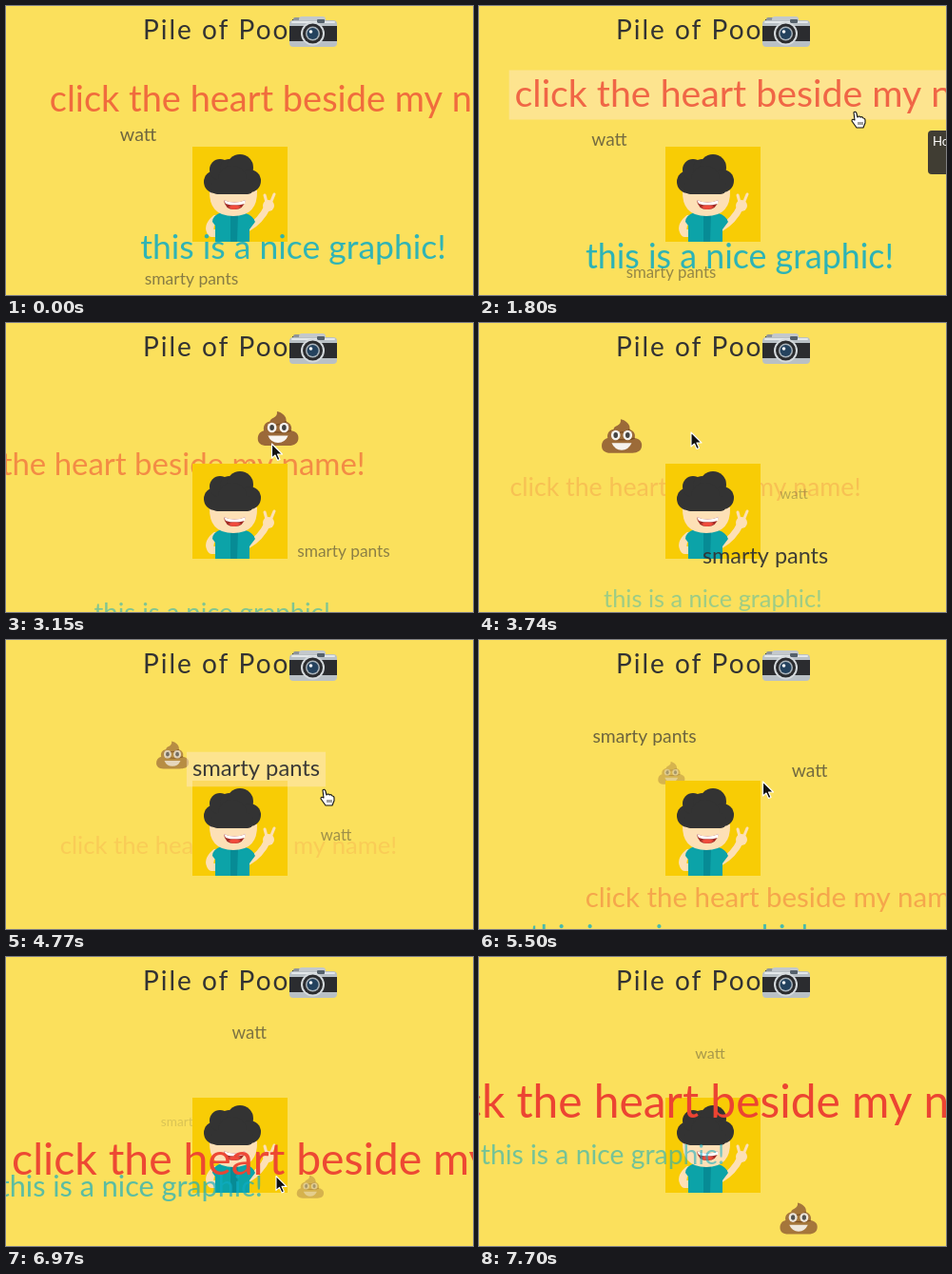
These frames come from a looping animation (491x304 px, 7.8 s). An HTML page with a canvas:

```html
<!DOCTYPE html>
<html>
<head>
<meta charset="utf-8">
<style>
html, body { margin: 0; width: 100%; height: 100%; overflow: hidden; background: #fbe05c; }
canvas { display: block; }
</style>
</head>
<body>
<canvas id="stage" width="491" height="304"></canvas>
<script>
const ctx = document.getElementById('stage').getContext('2d');
const LOOP = 7800, START = 1350, STEP = 147.6;
const CX = 246, CY = 198, RADIUS = 125, DEPTH = 400;
const FONT = 'Lato, sans-serif';

// Key poses are [screen x, screen y, perspective scale] at the given steps.
const STEPS = [2, 3, 8, 16, 23, 33, 43];
const VIA = [2, 3, 8, 12, 16, 23, 33, 43];
const tags = [
  { text: 'click the heart beside my name!', size: 33.3, color: '#ec4432', at: VIA, hover: [0, 9],
    poses: [[308, 98, 1.14], [309, 92.5, 1.18], [230, 118, 1.446], [150, 148, .99], [217, 173, .803], [234, 216, .771], [355, 261, 1.235], [265, 152, 1.437]] },
  { text: 'this is a nice graphic!', size: 28.2, color: '#0fadc4', at: STEPS,
    poses: [[302, 254, 1.26], [274, 263.5, 1.27], [186, 302.5, 1.07], [246, 290, .9], [255, 322, 1.1], [152, 274, 1.17], [130, 208, 1.005]] },
  { text: 'watt', size: 17.7, color: '#333', at: STEPS,
    poses: [[139, 135, 1.11], [137, 140.5, 1.08], [167, 155.5, .886], [331, 180, .86], [347, 205, .94], [270, 91, 1.23], [243, 101, .91]] },
  { text: 'smarty pants', size: 17.3, color: '#333', at: VIA, hover: [19, 26],
    poses: [[195, 287, 1.01], [202, 280, .97], [261, 229, .79], [355, 240, 1], [301, 244.5, 1.354], [263, 135, 1.375], [174, 153, .875], [240, 200, .74]] },
  { at: STEPS,
    poses: [[250, 210, .78], [255, 205, .78], [355, 164, 1.12], [150, 119, 1.31], [175, 121, 1.06], [246, 185, .8], [336, 275, 1.22]] }
];
const pointer = { at: [3, 8, 16, 23, 33, 41], poses: [[398, 119], [340, 147], [227, 123], [337, 165], [268, 149], [300, 292]] };

const mix = (a, b, p) => a + (b - a) * p;

function segment({ at, poses }, step) {
  let i = 0;
  while (i < at.length - 2 && step >= at[i + 1]) i++;
  const p = Math.min(1, Math.max(0, (step - at[i]) / (at[i + 1] - at[i])));
  return [poses[i], poses[i + 1], p];
}

const unproject = ([x, y, s]) => [(x - CX) / s, (y - CY) / s, DEPTH * (1 - 1 / s)];

// Rotate along the great circle between two points on the sphere.
function slerp(a, b, p) {
  const la = Math.hypot(...a), lb = Math.hypot(...b);
  const dot = a.reduce((sum, v, i) => sum + v * b[i], 0) / (la * lb);
  const angle = Math.acos(Math.min(1, Math.max(-1, dot)));
  if (angle < .001) return a.map((v, i) => mix(v, b[i], p));
  const length = mix(la, lb, p) / Math.sin(angle);
  const wa = Math.sin((1 - p) * angle) * length / la, wb = Math.sin(p * angle) * length / lb;
  return a.map((v, i) => v * wa + b[i] * wb);
}

function place(tag, step) {
  const [a, b, p] = segment(tag, step);
  const [x, y, z] = slerp(unproject(a), unproject(b), p);
  const scale = DEPTH / (DEPTH - z);
  return { tag, z, scale, x: CX + x * scale, y: CY + y * scale };
}

function fill(color, path) {
  ctx.fillStyle = color;
  ctx.fill(new Path2D(path));
}
function stroke(color, width, path) {
  ctx.strokeStyle = color;
  ctx.lineWidth = width;
  ctx.stroke(new Path2D(path));
}
function oval(color, x, y, rx, ry = rx) {
  ctx.fillStyle = color;
  ctx.beginPath();
  ctx.ellipse(x, y, rx, ry, 0, 0, 7);
  ctx.fill();
}
function box(color, x, y, w, h, r = 0) {
  ctx.fillStyle = color;
  ctx.beginPath();
  ctx.roundRect(x, y, w, h, r);
  ctx.fill();
}
function write(text, x, y, size, color, spacing = 0, weight = 400) {
  ctx.font = `${weight} ${size}px ${FONT}`;
  ctx.letterSpacing = spacing + 'px';
  ctx.fillStyle = color;
  ctx.fillText(text, x, y);
}

const isHovered = ({ hover }, step) => hover && step >= hover[0] && step <= hover[1];

function drawPoo() {
  fill('#936035', 'M-1-17C4-16 9-12 8-7C13-5 14-1 13 2C19 3 21 7 20 11C19 16 14 17 9 17H-11C-17 17-20 14-20 10C-20 6-18 3-14 2C-15-2-13-6-8-7C-8-11 0-10-1-17Z');
  stroke('#74471f', 1.2, 'M8-7Q3-3-6-4M13 2Q6 5-8 3');
  for (const x of [-6, 6]) {
    oval('#fff', x, -1, 4.6, 5);
    oval('#333', x, -1, 2.2, 2.8);
  }
  fill('#fff', 'M-10 7H10Q7 14 0 14T-10 7Z');
}

function drawTag({ tag, x, y, z, scale }, step) {
  ctx.save();
  const alpha = Math.min(1, Math.max(.1, .56 + .46 * z / RADIUS));
  if (tag.text) {
    const size = tag.size * scale;
    ctx.font = `400 ${size}px ${FONT}`;
    ctx.letterSpacing = '0px';
    const width = ctx.measureText(tag.text).width;
    if (isHovered(tag, step)) {
      const h = size * 1.02 + 12;
      box('rgba(255,232,205,.45)', x - width / 2 - 6, y + 1 - h / 2, width + 12, h);
    }
    ctx.globalAlpha = alpha;
    write(tag.text, x - width / 2, y + size * .35, size, tag.color);
  } else {
    ctx.globalAlpha = alpha;
    ctx.translate(x, y);
    ctx.scale(scale * .8, scale * .8);
    drawPoo();
  }
  ctx.restore();
}

function drawAvatar() {
  ctx.save();
  ctx.translate(196, 148);
  box('#f8cc05', 0, 0, 100, 100);
  ctx.lineCap = ctx.lineJoin = 'round';
  stroke('#fde0b6', 8, 'M24 76Q15 84 20 91L26 91');
  stroke('#fde0b6', 7, 'M58 86Q72 78 79 63');
  stroke('#fde0b6', 3, 'M79 62L76 51M81 62L86 50');
  oval('#fde0b6', 80, 62, 6, 6);
  fill('#0ca3a8', 'M31 69Q21 72 21 79L24 83V100H60V83Q65 83 65 77Q61 70 51 69Z');
  fill('#078b95', 'M42 72H52Q60 74 60 84V100H40V72Z');
  fill('#0ca3a8', 'M48 71Q62 70 66 79L60 87V100H47Z');
  fill('#fde0b6', 'M18 46H68Q69 73 43 73T18 46Z');
  fill('#a02b26', 'M33 56Q44 61 56 56Q54 66 44 66T33 56Z');
  fill('#fff', 'M33 56Q44 61 56 56L55 60Q44 63 35 60Z');
  fill('#ef4b3c', 'M38 63Q44 60 51 63Q48 66 44 66T38 63Z');
  for (const [x, y, r] of [[24, 37, 12], [29, 24, 11], [38, 22, 9], [50, 22, 14], [60, 36, 12], [42, 35, 15]])
    oval('#333', x, y, r);
  box('#333', 20, 34, 44, 16, 6);
  ctx.restore();
}

function drawCamera() {
  box('#8e9499', 302, 12, 9, 5, 2);
  box('#c3c8cc', 308, 11, 28, 8, 3);
  box('#b9c0c5', 298, 15, 50, 28, 4);
  box('#2b2c2f', 298, 21, 50, 16);
  box('#e4e8ea', 300, 16, 46, 2, 1);
  box('#55616b', 327, 14, 8, 4, 1);
  oval('#d5dadd', 322.5, 29, 12.5);
  oval('#2b2c2f', 322.5, 29, 10.5);
  oval('#aab3ba', 322.5, 29, 7.5);
  oval('#24425e', 322.5, 29, 6);
  oval('#fff', 320.5, 27, 1.8);
}

function drawTooltip(step) {
  const wide = step > 4;
  const x = wide ? mix(370, 358, (step - 8) / 5) : 472;
  const y = wide ? 152 : 131;
  box('#403d33', x, y, 240, wide ? 25 : 46, 4);
  write('Holly Zhong Tian and 2 others', x + 5, y + 16, 13.2, '#fff', -.1);
}

function drawPointer(step, hand) {
  const [a, b, p] = segment(pointer, step);
  ctx.save();
  ctx.translate(mix(a[0], b[0], p), mix(a[1], b[1], p));
  ctx.lineJoin = 'round';
  const shape = hand
    ? 'M-4-7Q-2-9-1-6L0-2Q2-4 3-2Q5-3 6-1Q8-1 8 1V4L6 9H-1L-6 2Q-6-1-3 1Z'
    : 'M-4-8V7L-.5 4L2 9.5L4.5 8.5L2 3H7Z';
  fill(hand ? '#fff' : '#111', shape);
  stroke(hand ? '#111' : '#fff', 1.1, shape);
  if (hand) stroke('#111', .8, 'M1 3V6M3 3V6M5 3V6');
  ctx.restore();
}

function draw(now) {
  const step = Math.floor((now % LOOP - START) / STEP);
  const placed = tags.map(tag => place(tag, step)).sort((a, b) => a.z - b.z);
  box('#fbe05c', 0, 0, 491, 304);
  write('Pile of Poo!', 144, 35, 28, '#333', 2);
  placed.filter(item => item.z < 0).forEach(item => drawTag(item, step));
  drawAvatar();
  placed.filter(item => item.z >= 0).forEach(item => drawTag(item, step));
  drawCamera();
  if (step >= 1 && step <= 9) drawTooltip(step);
  if (step >= 0 && step < 42) drawPointer(step, tags.some(tag => isHovered(tag, step)));
  requestAnimationFrame(() => draw(performance.now() - begin));
}

const begin = performance.now();
draw(0);
</script>
</body>
</html>
```
